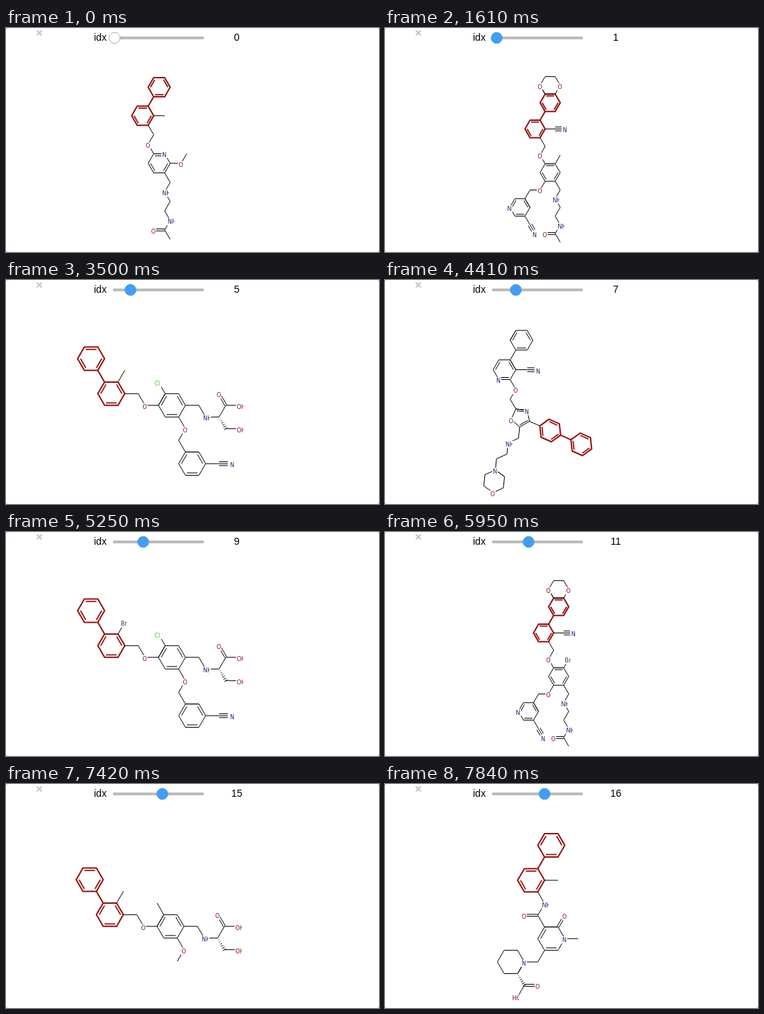
An HTML page with a canvas that plays this animation: 526x316 px, repeating every 8000 ms.

```html
<!DOCTYPE html>
<html lang="en">
<head>
<meta charset="utf-8">
<title>Molecule browser</title>
<style>
  html, body { margin: 0; width: 100%; height: 100%; overflow: hidden; background: #bbb; }
  canvas { display: block; width: 526px; height: 316px; background: #fff; border-radius: 3px; }
</style>
</head>
<body>
<canvas id="stage" width="526" height="316"></canvas>
<script>
const ctx = document.getElementById('stage').getContext('2d');
const LOOP = 8000;
const BLACK = '#000', RED = '#931414';
const ATOM_COLORS = { N: '#1c1c6c', O: '#860c26', H: '#860c26', C: '#45c41c', B: '#54341a' };

// Directions are clock hours: 3 points right, 6 down. One step is one bond.
let bondLength = 15;
let labels = [];

function step([x, y], hour, k = 1) {
  const a = (hour - 3) * Math.PI / 6;
  return [x + bondLength * k * Math.cos(a), y + bondLength * k * Math.sin(a)];
}

function line(points, color = BLACK, width = color === RED ? 2 : 1) {
  ctx.strokeStyle = color;
  ctx.lineWidth = width;
  ctx.lineJoin = 'round';
  ctx.beginPath();
  for (const [x, y] of points) ctx.lineTo(x + .5, y + .5);
  ctx.stroke();
}

function parallels(from, to, hour, offsets) {
  for (const o of offsets) line([from, to].map(p => step(p, hour + 3, o / bondLength)));
}

function hashes(from, hour, count = 6) {
  for (let i = 1; i <= count; i++) {
    const mid = step(from, hour, i / count);
    const half = 2.6 * i / count / bondLength;
    line([step(mid, hour + 3, half), step(mid, hour - 3, half)]);
  }
}

// Walks bonds such as '5 7:NH =9:O'. Prefix: = double, # triple, ~ hashed, * red.
function chain(point, bonds) {
  for (const bond of bonds.split(' ')) {
    const [, kind, hour, name] = bond.match(/^([=#~*]?)([\d.]+):?(\w*)$/);
    const next = step(point, +hour);
    if (kind === '=') parallels(point, next, +hour, [-1.4, 1.4]);
    else if (kind === '#') parallels(point, step(point, +hour, .65), +hour, [-2.7, 0, 2.7]);
    else if (kind === '~') hashes(point, +hour);
    else line([point, next], kind ? RED : BLACK);
    if (name) label(next, name);
    point = next;
  }
  return point;
}

// Ring entered at a corner; `faces` are the hours its double edges look towards.
// Returns a function that gives the corner at an hour.
function ring(entry, hour, faces = [], color = BLACK, sides = 6) {
  const radius = .5 / Math.sin(Math.PI / sides);
  const center = step(entry, hour, radius);
  const corner = (h, k = 1) => step(center, h, radius * k);
  const corners = Array.from({ length: sides + 2 }, (_, i) => corner(hour + 6 + 12 / sides * i));
  line(corners, color);
  for (const f of faces) {
    line([corner(f - 6 / sides, .79), corner(f + 6 / sides, .79)], color, color === RED ? 1.7 : 1);
  }
  return h => corner(h);
}

function label(point, name) {
  labels.push([point, name]);
}

// Hydrogens beside another atom are cropped at the label's edge.
function drawLabel([[x, y], name]) {
  const cropped = name.length > 1 && name.includes('H');
  const width = name.length > 1 ? 10 : 6;
  const left = name === 'HO' ? x - 7 : cropped ? x - 3 : x - width / 2;
  const middle = y + 2.5;
  ctx.save();
  ctx.fillStyle = '#fff';
  ctx.fillRect(left - 1, middle - 5, width + 2, 10);
  ctx.beginPath();
  ctx.rect(left - 1, middle - 6, width + (cropped ? .5 : 4), 12);
  ctx.clip();
  ctx.fillStyle = ATOM_COLORS[name[0]];
  ctx.font = '8px "DejaVu Sans", sans-serif';
  ctx.textAlign = 'left';
  ctx.fillText(name, left, middle + 3);
  ctx.restore();
}

// ---- molecules ----
const EVEN = [12, 4, 8], ODD = [2, 6, 10];
const NITRILE = '3 #3:N';

// Two linked red rings; returns the second.
function biaryl(entry, entryHour, linkHour, first, second) {
  const a = ring(entry, entryHour, first, RED);
  return ring(chain(a(linkHour), '*' + linkHour), linkHour, second, RED);
}

function acetamideTail(point) {
  const carbonyl = chain(point, '5 7:NH 5 7 5:NH 7');
  chain(carbonyl, '=9:O');
  chain(carbonyl, '5');
}

function methoxyArene(nitrogen) {
  bondLength = 15.5;
  const middle = biaryl([200, 83], 3, 7, ODD, EVEN);
  chain(middle(3), '3');
  const core = ring(chain(middle(5), '5 7:O 5'), 5, EVEN);
  if (nitrogen) label(core(1), 'N');
  chain(core(3), '3:O 1');
  acetamideTail(core(5));
}

function benzodioxane(dx, halogen, pyridine) {
  bondLength = 14.2;
  const entry = [218.2 + dx, 105];
  const middle = biaryl(entry, 3, 7, EVEN, EVEN);
  const dioxane = ring(step(entry, 1), 1);
  label(dioxane(9), 'O');
  label(dioxane(3), 'O');
  chain(middle(3), NITRILE);
  const core = ring(chain(middle(5), '5 7:O 5'), 5, EVEN);
  chain(core(1), halogen ? '1:' + halogen : '1');
  acetamideTail(core(5));
  const side = ring(chain(core(7), '7:O 9 7'), 7, ODD);
  if (pyridine) label(side(9), 'N');
  chain(side(pyridine ? 5 : 9), pyridine ? '5 #5:N' : '9 #9:N');
}

function triazine() {
  bondLength = 22;
  const middle = ring([181.7, 222], 6, [3, 7, 11], RED);
  ring(chain(middle(4), '*4'), 4, [1, 5, 9], RED);
  chain(middle(2), '2');
  const imidazole = ring(chain(middle(12), '12'), 12, [9.6, 4.8], BLACK, 5);
  const core = ring(imidazole(10.8), 1, [10, 2]);
  for (const p of [imidazole(8.4), imidazole(1.2), core(9), core(3)]) label(p, 'N');
  chain(core(1), '1 3:NH 1 3 1:OH');
}

function oxazole() {
  bondLength = 16;
  const phenyl = ring([176, 84.5], 3, ODD);
  const pyridine = ring(chain(phenyl(7), '7'), 7, ODD);
  label(pyridine(7), 'N');
  chain(pyridine(3), NITRILE);
  const core = ring(chain(pyridine(5), '5:O 7 5'), 5, [12.2, 5], BLACK, 5);
  label(core(1.4), 'N');
  label(core(8.6), 'O');
  const tilted = EVEN.map(h => h + .8);
  biaryl(chain(core(3.8), '3.8'), 3.8, 3.8, tilted, tilted);
  const morpholine = ring(chain(core(6.2), '6.2 8.2:NH 6.2 8.2 6.2:N'), 6.2);
  label(morpholine(6.2), 'O');
}

function serine({ dx = 0, dy = 0, top = '', side = '', benzyl = true, acid = true }) {
  bondLength = 19;
  const middle = biaryl([100.5 + dx, 110.5 + dy], 3, 5, EVEN, ODD);
  chain(middle(1), top ? '1:' + top : '1');
  const core = ring(chain(middle(3), '3 5:O 3'), 3, ODD);
  chain(core(11), side ? '11:' + side : '11');
  const alpha = chain(core(3), '3 5:NH 3');
  const carboxyl = chain(alpha, '1');
  chain(carboxyl, '3:OH');
  if (acid) {
    chain(carboxyl, '=11:O');
    chain(alpha, '~5 3:OH');
  }
  const ether = chain(core(5), '5:O 7');
  if (benzyl) chain(ring(chain(ether, '5'), 5, ODD)(3), NITRILE);
}

function pyridone(dx, methyl) {
  bondLength = 19;
  const middle = biaryl([215 + dx, 86], 3, 7, ODD, EVEN);
  chain(middle(3), '3');
  const amide = chain(middle(5), '5:NH 7');
  chain(amide, '=9:O');
  const core = ring(chain(amide, '5'), 5, [6, 10]);
  chain(core(1), '=1:O');
  label(core(3), 'N');
  if (methyl) chain(core(3), '3');
  const piperidine = ring(chain(core(7), '7 9:N'), 9);
  const acid = chain(piperidine(5), '~5');
  chain(acid, '=3:O');
  chain(acid, '7:HO');
}

const molecules = [
  () => methoxyArene(true),
  () => benzodioxane(0, '', true),
  () => pyridone(-3, false),
  triazine,
  () => methoxyArene(false),
  () => serine({ side: 'Cl' }),
  () => serine({ dx: 9, dy: 24, side: 'Cl', acid: false }),
  oxazole,
  () => benzodioxane(7, 'Cl', true),
  () => serine({ top: 'Br', side: 'Cl' }),
  () => serine({ side: 'Br' }),
  () => benzodioxane(12, 'Br', true),
  () => serine({ top: 'Br' }),
  () => benzodioxane(14, 'Br', false),
  () => serine({ dx: -8, dy: 24, side: 'Cl', benzyl: false }),
  () => serine({ dx: -2, dy: 24, benzyl: false }),
  () => pyridone(0, true),
];

// ---- controls ----
function controls(idx, held) {
  line([[43, 3], [50, 10]], '#c6c6c6', 2);
  line([[50, 3], [43, 10]], '#c6c6c6', 2);

  ctx.fillStyle = '#000';
  ctx.font = '14px "Liberation Sans", Arial, sans-serif';
  ctx.textAlign = 'left';
  ctx.fillText('idx', 124, 18);
  ctx.textAlign = 'center';
  ctx.fillText(idx, 325.5, 18);

  ctx.fillStyle = '#bcbcbc';
  ctx.beginPath();
  ctx.roundRect(151, 12, 128, 4, 1);
  ctx.fill();

  ctx.beginPath();
  ctx.arc(153 + 4.5 * idx, 14, 7.8, 0, 2 * Math.PI);
  ctx.fillStyle = held ? '#459df0' : '#fff';
  ctx.fill();
  ctx.lineWidth = 1;
  ctx.strokeStyle = held ? '#459df0' : '#b0b0b0';
  ctx.stroke();
}

// ---- timeline: [slider moves, molecule follows] for idx 1, 2, 3 ... ----
const HELD_FROM = 910;
const steps = [
  [1610], [2100], [2590, 2660], [3080], [3500], [3920], [4410], [4830],
  [5180, 5250], [5530, 5600], [5950], [6300], [6650], [7000, 7070], [7420], [7770, 7840],
];

let shown = '';
function render(now) {
  const t = now % LOOP;
  const idx = steps.filter(s => t >= s[0]).length;
  const molecule = steps.filter(s => t >= s[s.length - 1]).length;
  const held = t >= HELD_FROM;
  const state = [idx, molecule, held].join();
  if (state === shown) return;
  shown = state;
  ctx.clearRect(0, 0, 526, 316);
  labels = [];
  molecules[molecule]();
  labels.forEach(drawLabel);
  controls(idx, held);
}

const start = performance.now();
function tick() {
  render(performance.now() - start);
  requestAnimationFrame(tick);
}
tick();
</script>
</body>
</html>
```
